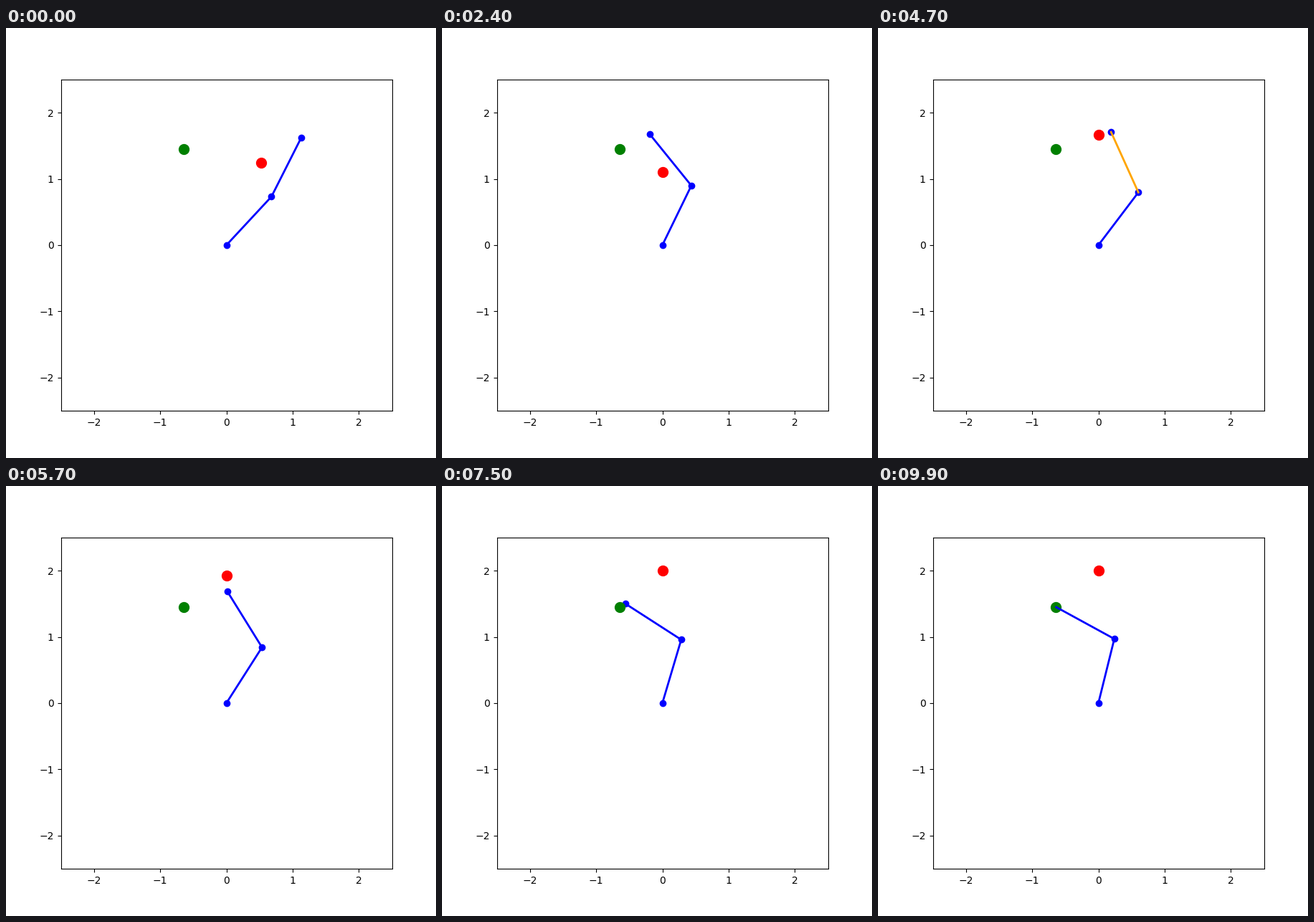
A matplotlib script for the animation above (10 s loop, 600 px wide and 600 px high).

```python
import numpy as np
import matplotlib.pyplot as plt
from matplotlib.animation import FuncAnimation

FRAMES, INTERVAL = 100, 100
GOAL = (-0.645, 1.447)
GOAL_ANGLES = np.array([76.3, 75.4])   # joint angles that reach the goal
GAP = np.array([29.2, 59.3])           # how far the joints start from them
KEEP = 0.9                             # share of the error left after a step
SHARE = np.array([1, 0.58])            # effect of the repulsion on each joint
RELEASE = 55.5                         # the obstacle lets the arm pass
NEAR = range(26, 51)                   # forearm too close to the obstacle


def track(*keys):
    """Smooth curve through (time, value) keys without overshoot."""
    t, v = np.array(keys, float).T
    h = np.diff(t)
    s = np.diff(v) / h
    m = np.r_[s[0], np.zeros(len(s) - 1), s[-1]]
    for i in range(1, len(s)):
        if s[i - 1] * s[i] > 0:
            m[i] = 2 * s[i - 1] * s[i] / (s[i - 1] + s[i])

    def at(x):
        x = np.clip(x, t[0], t[-1])
        i = min(np.searchsorted(t, x, side="right") - 1, len(h) - 1)
        u = (x - t[i]) / h[i]
        return (v[i] * (1 + 2 * u) * (1 - u) ** 2
                + v[i + 1] * u * u * (3 - 2 * u)
                + h[i] * u * (1 - u) * (m[i] * (1 - u) - m[i + 1] * u))

    return at


push = track((0, 0), (6, 3), (12, 2.9), (22, 8.3), (36, 21.5),
             (42, 23.6), (RELEASE, 22))
height = track((0, 1.245), (12, 1.136), (17, 1.03), (24, 1.1),
               (36, 1.385), (60, 2))


def obstacle_at(n):
    # drifts to the left wall, leaves it for a moment, then slides up
    x = max(0, 0.525 - 0.048 * n, 0.097 - 0.0022 * (n - 37.5) ** 2)
    return [x], [height(n)]


def joints(n):
    held = push(n) * KEEP ** max(0, n - RELEASE)
    angles = GOAL_ANGLES - GAP * KEEP ** n - SHARE * held
    a = np.radians(np.cumsum(angles))
    return np.r_[0, np.cumsum(np.cos(a))], np.r_[0, np.cumsum(np.sin(a))]


fig, ax = plt.subplots(figsize=(6, 6), dpi=100)
ax.set_xlim(-2.5, 2.5)
ax.set_ylim(-2.5, 2.5)
ax.set_aspect("equal")

dots, = ax.plot([], [], "bo")
obstacle, = ax.plot([], [], "ro", markersize=10)
ax.plot(*GOAL, "go", markersize=10)
upper, = ax.plot([], [], "b-", lw=2)
fore, = ax.plot([], [], "b-", lw=2)


def update(n):
    x, y = joints(n)
    dots.set_data(x, y)
    upper.set_data(x[:2], y[:2])
    fore.set_data(x[1:], y[1:])
    fore.set_color("orange" if n in NEAR else "b")
    obstacle.set_data(*obstacle_at(n))
    return dots, obstacle, upper, fore


anim = FuncAnimation(fig, update, frames=FRAMES, interval=INTERVAL,
                     repeat=True, repeat_delay=0)
plt.show()
```
